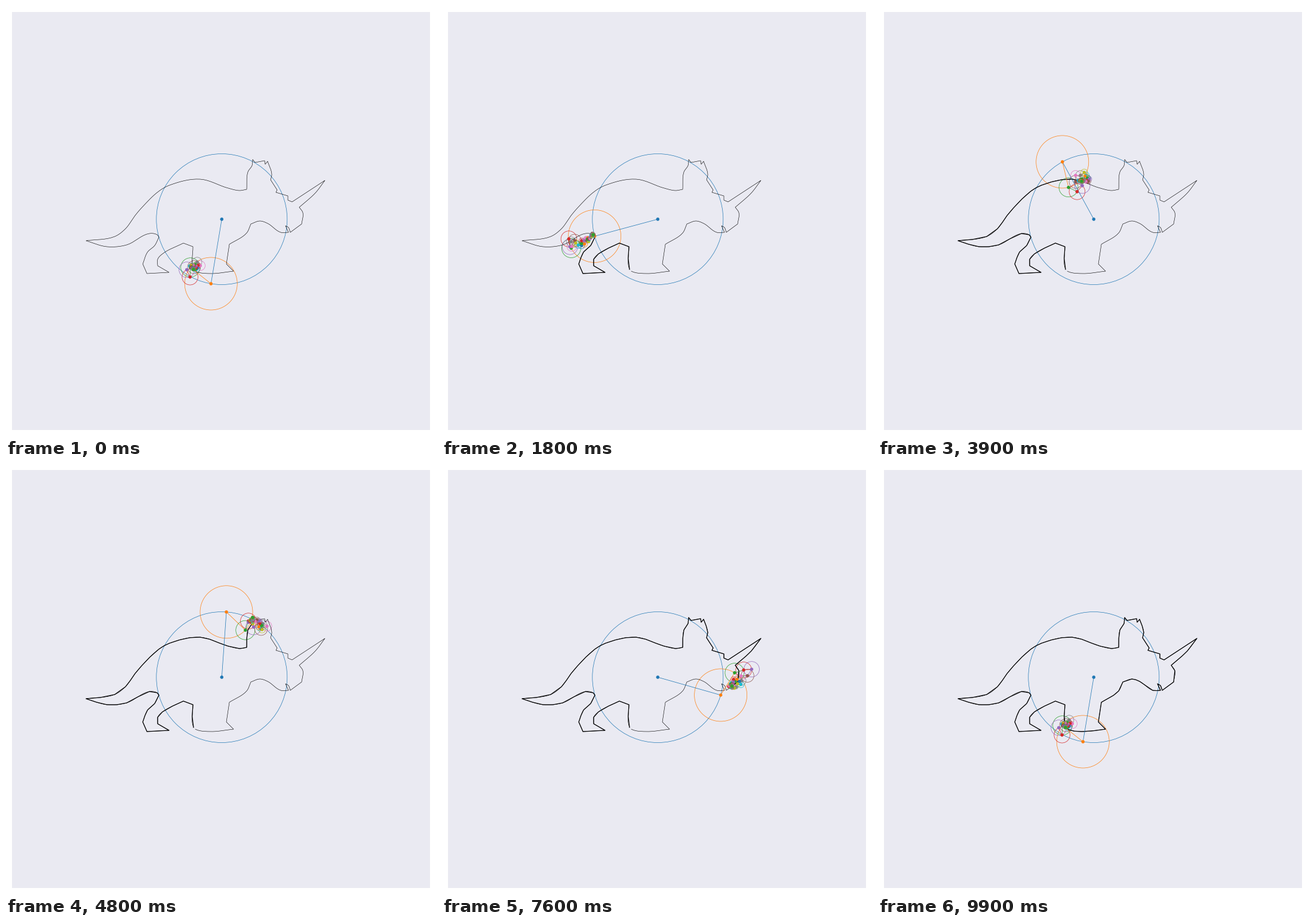
Recreate the animation shown at these times as a matplotlib script. Size 720x720 px, loop 10000 ms.

```python
import numpy as np
import matplotlib.pyplot as plt
from matplotlib.animation import FuncAnimation
from matplotlib.collections import EllipseCollection, LineCollection

SIZE, PAD, FRAMES = 720, 10, 100
STEPS = FRAMES - 1
CENTRE = 361.3 + 357j

# Outline corners by body part, and the steps spent on each part
HIND_LEG = [(314, 441), (313, 403), (297, 397), (262, 415), (254, 424),
            (254, 435), (273, 446), (236, 448), (229, 432), (237, 412),
            (249, 401), (256, 387)]
TAIL = [(253, 383), (240, 381), (202, 400), (169, 403), (134, 393),
        (182, 386), (200, 373), (216, 351)]
BACK = [(227, 338), (256, 310), (274, 300), (325, 290), (372, 305),
        (391, 309), (403, 307), (405, 278), (412, 267)]
FRILL = [(413, 257), (417, 262), (433, 259), (434, 265), (438, 260),
         (445, 282), (443, 291), (454, 308), (452, 312), (472, 318),
         (472, 325)]
FACE = [(479, 328), (534, 292), (518, 313), (491, 337), (497, 346),
        (495, 365), (476, 379), (473, 371), (468, 368), (473, 379),
        (460, 379), (438, 364), (425, 360)]
FRONT_LEG = [(410, 365), (403, 380), (374, 399), (369, 432), (381, 444),
             (341, 448), (317, 444)]
PARTS = [HIND_LEG, TAIL, BACK, FRILL, FACE, FRONT_LEG]
PART_STEPS = [18, 13, 17, 17, 21, 13]

# Largest arms: radius, turns per loop, start angle in degrees
MAIN_ARMS = [(109.5, 1, 99.5), (44, -1, -141.7), (16, -3, 92), (13.3, 3, -114.4)]


def to_xy(z):
    return np.column_stack([z.real, z.imag])


def make_curve(points):
    """Closed curve through points, smooth except at sharp turns."""
    side = np.roll(points, -1) - points
    out = side / np.abs(side)
    into = np.roll(out, 1)
    mean = (into + out) / np.maximum(np.abs(into + out), 1e-9)
    sharp = np.abs(np.angle(out / into)) > np.radians(45)
    leave = np.where(sharp, out, mean) * np.abs(side)
    arrive = np.roll(np.where(sharp, into, mean), -1) * np.abs(side)

    def curve(u):
        k = np.floor(u).astype(int) % len(points)
        t = u - np.floor(u)
        ease = t * t * (3 - 2 * t)
        return (points[k] + ease * side[k] + t * (1 - t) ** 2 * leave[k]
                - t * t * (1 - t) * arrive[k])

    return curve


def corner_times(points):
    """Whole step at which each corner is reached."""
    cost = np.abs(np.roll(points, -1) - points) + 15
    times, first, start = [], 0, 0
    for part, steps in zip(PARTS, PART_STEPS):
        c = cost[first:first + len(part)]
        times.extend(start + np.round((np.cumsum(c) - c) / c.sum() * steps))
        first += len(part)
        start += steps
    return times + [STEPS]


def build_arms(path):
    """Return complex lengths and frequencies, largest first."""
    radius, turns, start = np.array(MAIN_ARMS).T
    main = radius * np.exp(1j * np.radians(start))
    t = np.arange(STEPS) / STEPS
    rest = path - CENTRE - main @ np.exp(2j * np.pi * np.outer(turns, t))
    coef = np.fft.fft(rest) / STEPS
    freq = np.fft.fftfreq(STEPS, 1 / STEPS)
    order = np.argsort(-np.abs(coef))
    return np.append(main, coef[order]), np.append(turns, freq[order])


corners = np.array([complex(x, y) for part in PARTS for x, y in part])
count = len(corners)
curve = make_curve(corners)
outline = curve(np.linspace(0, count - 1, 8 * (count - 1) + 1))
path = curve(np.interp(np.arange(STEPS), corner_times(corners), np.arange(count + 1)))
trace = np.append(path, path[0])
arms, freqs = build_arms(path)
colors = [f"C{i % 10}" for i in range(len(arms))]

fig = plt.figure(figsize=(SIZE / 72, SIZE / 72), dpi=72, facecolor="white")
span = (SIZE - 2 * PAD) / SIZE
ax = fig.add_axes([PAD / SIZE, PAD / SIZE, span, span], facecolor="#eaeaf2")
ax.set(xlim=(PAD, SIZE - PAD), ylim=(SIZE - PAD, PAD), xticks=[], yticks=[])
for spine in ax.spines.values():
    spine.set_visible(False)

diameters = 2 * np.abs(arms)
zeros = np.zeros(len(arms))
circles = EllipseCollection(
    diameters, diameters, zeros, units="xy",
    offsets=np.column_stack([zeros, zeros]), offset_transform=ax.transData,
    facecolors="none", edgecolors=colors, linewidths=0.7, zorder=1)
links = LineCollection([], colors=colors, linewidths=0.75, zorder=3)
ax.add_collection(circles, autolim=False)
ax.add_collection(links, autolim=False)
ax.plot(outline.real, outline.imag, color="black", lw=0.6, zorder=2)
drawn, = ax.plot([], [], color="black", lw=1.2, zorder=2.5)
dots = ax.scatter(zeros, zeros, s=27, c=colors, linewidths=0.3, zorder=4)
tip, = ax.plot([], [], "o", color="black", ms=5, mew=0, zorder=3.5)


def update(step):
    vectors = arms * np.exp(2j * np.pi * freqs * step / STEPS)
    joints = CENTRE + np.append(0, np.cumsum(vectors))
    xy = to_xy(joints)
    circles.set_offsets(xy[:-1])
    dots.set_offsets(xy[:-1])
    links.set_segments(np.stack([xy[:-1], xy[1:]], axis=1))
    done = trace[:step + 1]
    drawn.set_data(done.real, done.imag)
    tip.set_data([joints[-1].real], [joints[-1].imag])
    return circles, links, dots, drawn, tip


anim = FuncAnimation(fig, update, frames=FRAMES, interval=100,
                     repeat=True, repeat_delay=0)
plt.show()
```
